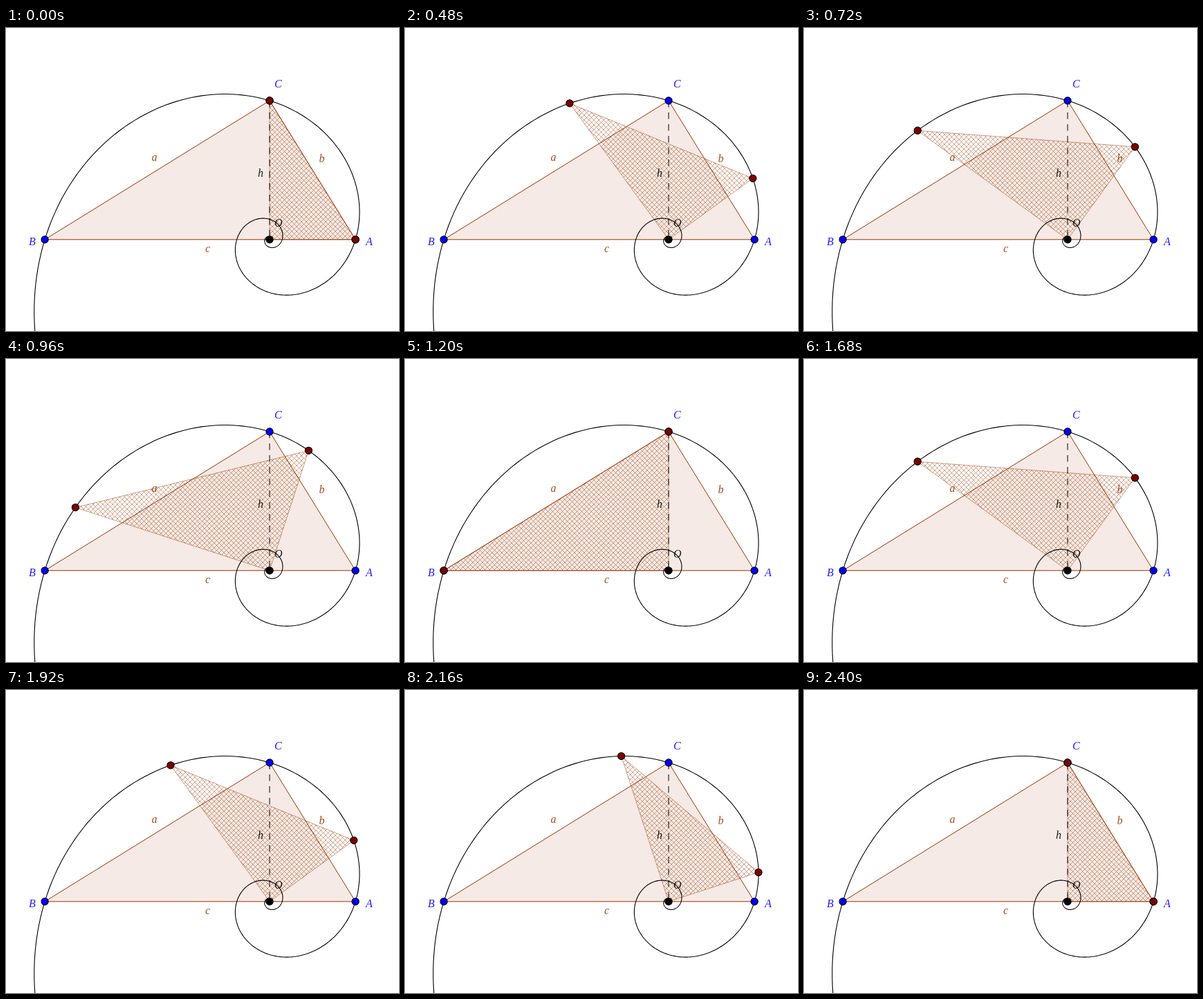
Write an HTML page that moves like this. It is 568x438 px and loops after 2.52 s.

```html
<!DOCTYPE html>
<html lang="en">
<head>
<meta charset="utf-8">
<title>Golden spiral and similar triangles</title>
<style>
  html, body { margin: 0; width: 100%; height: 100%; overflow: hidden; background: #fff; }
  svg { display: block; }
  text { font: italic 16px "Liberation Serif", "Times New Roman", serif; fill-opacity: .88; }
  .vertex { fill: #00f; }
  .side { fill: #930; }
  .fixed { fill: #00f; }
  .moving { fill: #7d0000; }
  circle { stroke: #000; stroke-width: 1.1; }
</style>
</head>
<body>
<svg width="568" height="438" viewBox="0 0 568 438">
  <defs>
    <pattern id="hatch" width="7" height="7" patternUnits="userSpaceOnUse">
      <path d="M-1 -1L8 8M-1 8L8 -1" stroke="#930" stroke-width=".55" stroke-opacity=".85"/>
    </pattern>
  </defs>
  <path id="triangle" fill="#930" fill-opacity=".1" stroke="#930" stroke-width="1" stroke-linejoin="round"/>
  <path id="sweep" fill="url(#hatch)" stroke="#930" stroke-width=".55" stroke-opacity=".85"/>
  <path id="height" stroke="#000" stroke-width="1" stroke-dasharray="9.5 7.5"/>
  <path id="spiral" fill="none" stroke="#000" stroke-width="1.1"/>
  <g id="dots"></g>
  <g class="vertex">
    <text x="520" y="314">A</text>
    <text x="33" y="314">B</text>
    <text x="388" y="86">C</text>
  </g>
  <g class="side">
    <text x="210.5" y="191.5">a</text>
    <text x="452.5" y="194">b</text>
    <text x="288" y="323.5">c</text>
  </g>
  <text x="364" y="215">h</text>
  <text x="388" y="287">O</text>
</svg>
<script>
const PHI = (1 + Math.sqrt(5)) / 2;
const O = [381, 305.8];
const RADIUS = 124.1;
const STEP = 120, STEPS = 21;
const $ = id => document.getElementById(id);

// Point on the spiral after q counter-clockwise quarter turns from A.
function spiral(q) {
  const r = RADIUS * PHI ** q, angle = q * Math.PI / 2;
  return [O[0] + r * Math.cos(angle), O[1] - r * Math.sin(angle)];
}

const line = points => "M" + points.map(p => p.map(v => v.toFixed(2)).join(" ")).join("L");
const draw = (id, d) => $(id).setAttribute("d", d);

function place(dot, [x, y]) {
  dot.setAttribute("cx", x);
  dot.setAttribute("cy", y);
}

function addDot(kind, point) {
  const dot = document.createElementNS("http://www.w3.org/2000/svg", "circle");
  dot.setAttribute("class", kind);
  dot.setAttribute("r", 5.1);
  place(dot, point);
  return $("dots").appendChild(dot);
}

const [A, C, B] = [0, 1, 2].map(spiral);
draw("triangle", line([A, B, C]) + "Z");
draw("height", line([C, O]));
draw("spiral", line(Array.from({ length: 521 }, (_, i) => spiral(-8 + i / 50))));

[A, B, C].forEach(p => addDot("fixed", p));
addDot("origin", O);
const near = addDot("moving", A), far = addDot("moving", C);

function render(time) {
  const step = Math.floor(time / STEP) % STEPS;
  const turn = Math.min(step, STEPS - 1 - step) / 10;
  const p = spiral(turn), q = spiral(turn + 1);
  draw("sweep", line([O, p, q]) + "Z");
  place(near, p);
  place(far, q);
}

const start = performance.now();
function tick() {
  render(performance.now() - start);
  requestAnimationFrame(tick);
}
tick();
</script>
</body>
</html>
```
